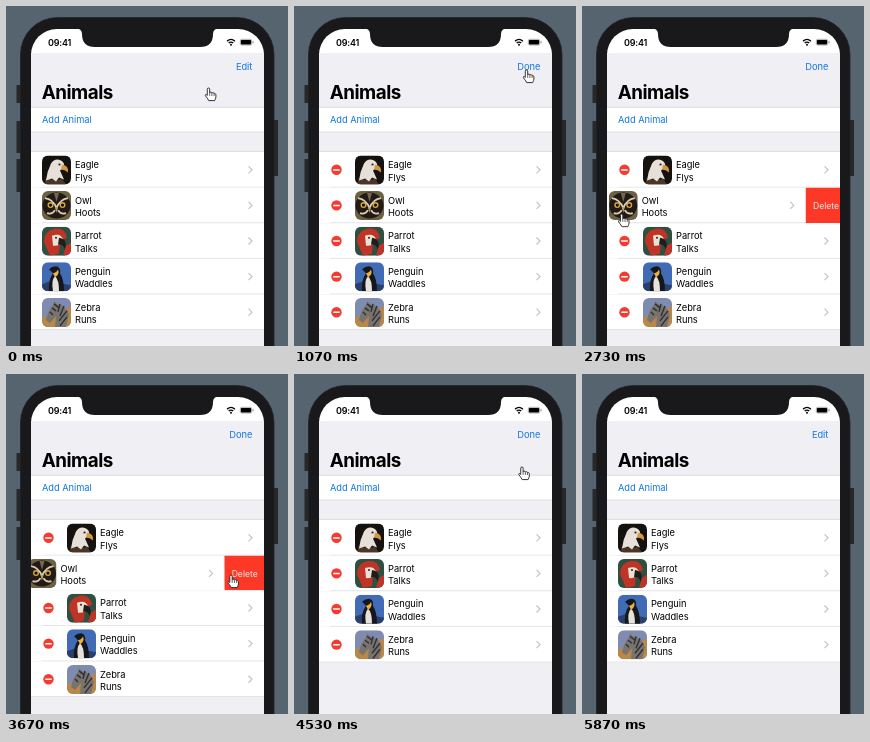
An HTML page for the animation above (6.2 s loop, 282 px wide and 340 px high).

```html
<!DOCTYPE html>
<html lang="en">
<head>
<meta charset="utf-8">
<title>Animals list</title>
<style>
  html, body { margin: 0; width: 100%; height: 100%; overflow: hidden; background: #56646f; }
  svg { display: block; }
  text { font: 400 9.3px Inter, "Liberation Sans", sans-serif; letter-spacing: -.05px; }
  .link { fill: #1277dc; }
  .end { text-anchor: end; }
  .clock { font-weight: 600; font-size: 9px; letter-spacing: -.2px; }
  .title { font-weight: 700; font-size: 18.8px; letter-spacing: -.5px; }
  .delete { font-size: 8.6px; letter-spacing: 0; fill: #ffeae6; text-anchor: middle; }
  .line { stroke: #d2d1d6; stroke-width: .7; }
</style>
</head>
<body>
<svg id="stage" width="282" height="340" viewBox="0 0 282 340">
  <defs>
    <clipPath id="screen"><rect x="25" y="23" width="233" height="360" rx="26"/></clipPath>
    <clipPath id="thumb"><rect width="29" height="29" rx="6"/></clipPath>
  </defs>
  <rect width="282" height="340" fill="#56646f"/>
  <path fill="#26282b" d="M10.500 79h5v18h-5zM10.500 115h5v32h-5zM10.500 153h5v33h-5zM267 114h5v56h-5z"/>
  <rect x="14.500" y="11.500" width="253.500" height="400" rx="37" fill="#19191b" stroke="#222326" stroke-width=".8"/>
  <g clip-path="url(#screen)">
    <rect x="25" y="23" width="233" height="317" fill="#fff"/>
    <path fill="#efeff4" d="M25 47h233v54H25zM25 126h233v214H25z"/>
    <path class="line" d="M25 101.300h233M25 126h233M25 145.700h233"/>
    <text class="title" x="35.800" y="93">Animals</text>
    <text class="link" x="36" y="117.200">Add Animal</text>
    <text class="link end" id="edit" x="246.300" y="63.600">Edit</text>
    <text class="link end" id="done" x="246.300" y="63.600">Done</text>
    <g id="list"></g>
  </g>
  <path fill="#19191b" d="M70 22Q76 23 76 28Q76 41 89 41H194Q207 41 207 28Q207 23 213 22Z"/>
  <text class="clock" x="42" y="39.600">09:41</text>
  <g fill="none" stroke="#000" stroke-width="1.300">
    <path d="M221 35.200q4-3.600 8 0M222.700 37.100q2.300-2 4.600 0"/>
    <circle cx="225" cy="38.700" r=".4"/>
    <rect x="234.300" y="33.300" width="11.400" height="5.800" rx="1.600" stroke="#777" stroke-width=".6"/>
    <rect x="234.900" y="33.900" width="10.200" height="4.600" rx=".9" fill="#000" stroke="none"/>
    <path d="M247 35.200v2" stroke="#777" stroke-width=".9"/>
  </g>
  <g id="cursor" stroke="#222" stroke-width=".9" stroke-linejoin="round">
    <path fill="#fff" d="M-1.200 6.500V.2Q-1.200-1 0-1T1.200 .2V3.800Q1.300 3 2.300 3.100T3.400 4Q3.600 3.400 4.600 3.700T5.600 4.600Q5.800 4.100 6.600 4.500T7.400 5.800V8Q7.400 9 6.200 11.600H.2Q-.5 10-2 8.200Q-3.800 6.200-3 5.700T-1.200 6.500Z"/>
    <path fill="none" stroke-width=".7" d="M1.200 3.800v3M3.400 4v3M5.600 4.600v2.400"/>
  </g>
</svg>
<script>
const LOOP = 6200, ROW = 35.6, TOP = 146;
const shape = (fill, d) => `<path fill="${fill}" d="${d}"/>`;
const stroke = (color, width, d) => `<path fill="none" stroke="${color}" stroke-width="${width}" d="${d}"/>`;
const dot = (fill, x, y, r) => `<circle fill="${fill}" cx="${x}" cy="${y}" r="${r}"/>`;
const ground = fill => shape(fill, 'M0 0h29v29H0z');

const animals = [
  ['Eagle', 'Flys', ground('#14110f')
    + shape('#4a3527', 'M2 29L4 22Q12 26 20 23L24 29Z')
    + shape('#e6e0d8', 'M9 8Q13 2 19 5Q23 7 22 12L18 15L22 24L17 22L14 26L10 23L4 25Q5 16 9 8Z')
    + shape('#d79a3a', 'M20 9Q27 10 26 17Q23 14 19 14Z') + dot('#2a2018', 17.5, 9, 1.1)],
  ['Owl', 'Hoots', ground('#6b6244')
    + '<ellipse fill="#211a16" cx="14.5" cy="14.5" rx="14" ry="13"/>'
    + shape('#75664f', 'M12 2h5l-2.500 9z')
    + dot('#d9a935', 8.5, 14, 3) + dot('#d9a935', 20.5, 14, 3)
    + dot('#111', 8.5, 14, 1.6) + dot('#111', 20.5, 14, 1.6)
    + stroke('#d9cdb4', 1.8, 'M3 7Q11 8 14.5 17Q18 8 26 7M5 22Q10 24 13 19M24 22Q19 24 16 19')
    + shape('#b3a06c', 'M13 16h3l-1.500 6z')],
  ['Parrot', 'Talks', ground('#2f5040')
    + shape('#c03428', 'M2 15Q2 4 13 2Q23 1 25 11L18 14L17 27L8 29Z')
    + shape('#ebe0d4', 'M10 9Q19 6 21 13Q18 20 11 19Z')
    + shape('#1f1c1c', 'M17 11Q26 12 23 23Q21 17 16 18Z') + dot('#222', 14, 11, 1)
    + shape('#c03428', 'M24 19l5-3v11l-8 2z')],
  ['Penguin', 'Waddles', ground('#416bb5') + shape('#2b3f6b', 'M0 22L8 19L29 23V29H0Z')
    + shape('#15171d', 'M7 29Q6 18 11 11L7 7Q10 4 14 4Q19 5 18 11Q22 17 22 29Z')
    + shape('#e6e2da', 'M11 29Q9 18 13 14Q17 17 17 29Z')
    + shape('#e8b23f', 'M11 11Q15 10 16 7Q18 12 13 15Z')],
  ['Zebra', 'Runs', ground('#7f8cb0') + shape('#b98747', 'M0 19L14 17L29 8V29H0Z')
    + shape('#77736f', 'M4 22Q6 12 11 7L12 3L15 6Q24 7 27 17L24 29H13L14 18L8 25Z')
    + stroke('#2f2e32', 1.4, 'M12 6L17 10M10 10L14 13M8 14L11 17M18 6L16 14M22 8L18 18M25 13L17 23M25 19L18 28')],
];

const $ = id => document.getElementById(id);
$('list').innerHTML = animals.map(([name, verb, photo], i) => `
  <svg class="row" x="25" width="233" height="${ROW}">
    <rect width="233" height="${ROW}" fill="#fff"/>
    <path class="line" d="M${i < 4 ? 11 : 0} 35.250H233"/>
    <g class="slide">
      <g class="minus">${dot('#f53b31', 0, 17.8, 5.2)}${stroke('#fff', 1.5, 'M-3.200 17.900h6.400')}</g>
      <g class="content">
        <g transform="translate(11 3.500)"><g clip-path="url(#thumb)">${photo}</g></g>
        <text x="44" y="16.200">${name}</text><text x="44" y="28.500">${verb}</text>
      </g>
      ${stroke('#c3c3c7', 1.2, 'M217.500 14.300l3.500 3.500l-3.500 3.500')}
      <path fill="#fe3826" d="M233 0h40v${ROW}h-40z"/>
      <text class="delete" x="253.200" y="21">Delete</text>
    </g>
  </svg>`).join('');

const all = name => [...document.querySelectorAll('.' + name)];
const rows = all('row'), slides = all('slide'), minuses = all('minus'), contents = all('content');
const move = (el, x, y = 0) => el.setAttribute('transform', `translate(${x} ${y})`);

const ramp = (t, start, duration) => {
  const p = Math.min(1, Math.max(0, (t - start) / duration));
  return .5 - .5 * Math.cos(Math.PI * p);
};

// Fingertip of the pointer: time, x, y
const path = [
  [0, 202.5, 83], [40, 202.5, 83], [500, 232.5, 65], [1180, 232.5, 65], [1330, 221, 86],
  [1650, 145, 158], [1870, 88, 203], [2000, 69, 200], [2200, 42, 196], [2550, 42, 196],
  [2730, 39.5, 209], [3130, 120, 229], [3300, 185, 225], [3470, 225, 202], [3680, 225, 202],
  [3930, 189.5, 218], [4270, 222, 152], [4780, 228, 62], [5560, 228, 62], [5850, 292, 50], [LOOP, 292, 50],
];

// Slope of the path at a point, zero beside a pause
function slope(i, axis) {
  const a = path[Math.max(i - 1, 0)], b = path[i], c = path[Math.min(i + 1, path.length - 1)];
  const still = [a, c].some(p => p[1] === b[1] && p[2] === b[2]);
  return still ? 0 : (c[axis] - a[axis]) / (c[0] - a[0]);
}

function pointer(t, axis) {
  const i = path.findIndex(p => p[0] > t) - 1, a = path[i], b = path[i + 1];
  const span = b[0] - a[0], u = (t - a[0]) / span, v = 1 - u;
  return a[axis] * v * v * (1 + 2 * u) + b[axis] * u * u * (1 + 2 * v)
    + span * u * v * (slope(i, axis) * v - slope(i + 1, axis) * u);
}

function draw(now) {
  const t = now % LOOP;
  const editing = ramp(t, 740, 320) - ramp(t, 5500, 330);
  const swipe = ramp(t, 2510, 290), removed = ramp(t, 3640, 290);
  const pressed = (t > 715 && t < 760) || (t > 5450 && t < 5520) ? .5 : 1;

  $('edit').setAttribute('opacity', (1 - editing) * pressed);
  $('done').setAttribute('opacity', editing * pressed);
  rows.forEach((row, i) => {
    row.setAttribute('y', TOP + ROW * (i - (i > 1 ? removed : 0)));
    move(contents[i], 25 * editing);
    move(minuses[i], 17.5 - 25 * (1 - editing));
    minuses[i].setAttribute('opacity', editing);
  });
  rows[1].setAttribute('height', ROW * (1 - removed));
  move(slides[1], -39.5 * swipe);
  move($('cursor'), pointer(t, 1), pointer(t, 2));
}

const start = performance.now();
function tick() {
  draw(performance.now() - start);
  requestAnimationFrame(tick);
}
tick();
</script>
</body>
</html>
```
